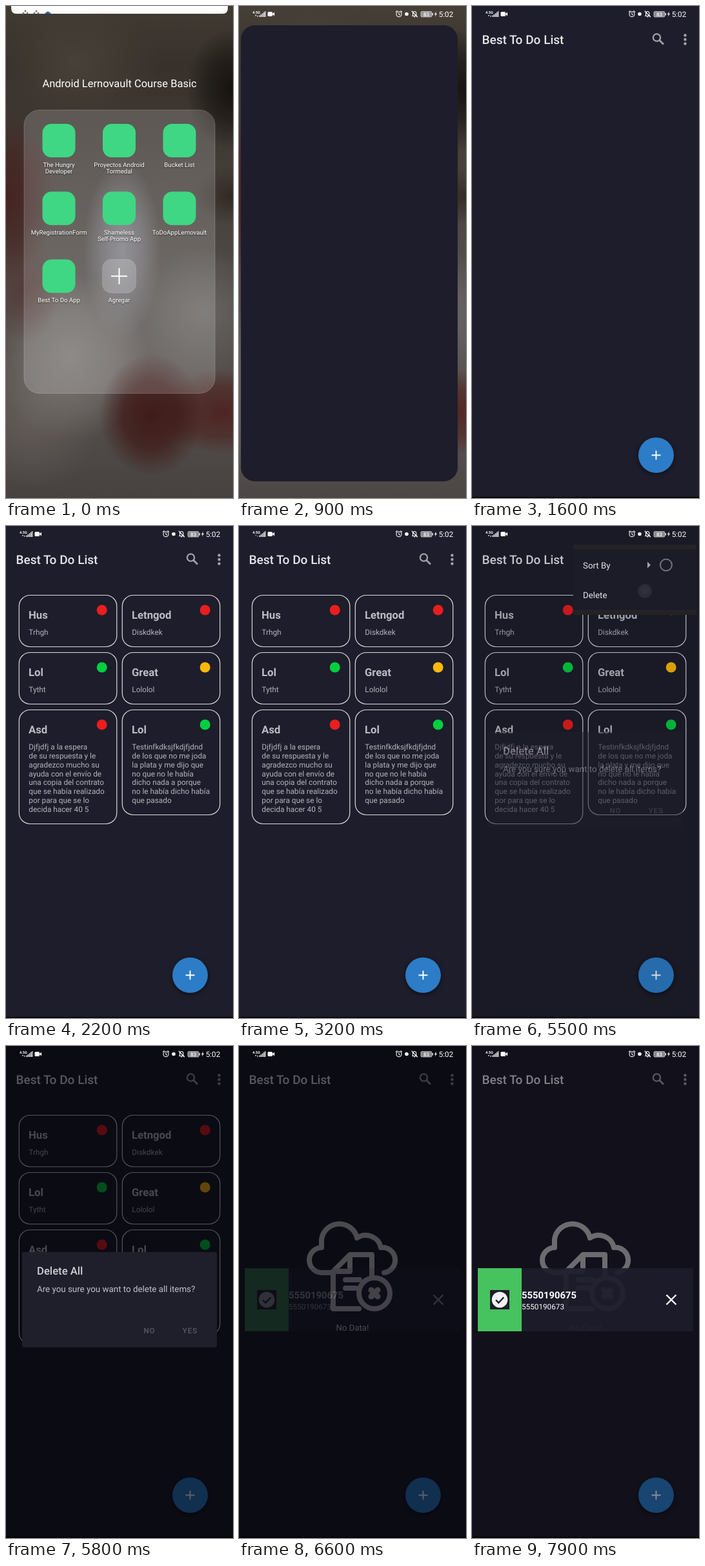
An HTML page that plays this animation: 352x764 px, repeating every 8000 ms.

```html
<!DOCTYPE html>
<html lang="es">
<head>
<meta charset="utf-8">
<title>Best To Do List</title>
<style>
html, body { margin: 0; width: 100%; height: 100%; overflow: hidden; background: #1e1d2b; }
body { position: relative; font-family: Roboto, sans-serif; }
.layer, .layer > svg { position: absolute; left: 0; top: 0; width: 352px; height: 764px; display: block; }
text { font-family: Roboto, sans-serif; text-rendering: geometricPrecision; }
.mid { text-anchor: middle; }
.line { fill: none; stroke-linecap: round; stroke-linejoin: round; }
.layer, .a { animation: 8s linear infinite; }

#home {
  background:
    radial-gradient(70px 95px at 350px 130px, #14100ce6, #14100c88 50%, transparent),
    radial-gradient(60px 45px at 350px 295px, #2e2721cc, transparent),
    radial-gradient(75px 130px at 0 295px, #4b2422f0, #4b242299 55%, transparent),
    radial-gradient(55px 85px at 30px 440px, #5b3633aa, transparent),
    radial-gradient(80px 95px at 225px 635px, #431a17f0, #431a17b0 55%, transparent),
    radial-gradient(110px 65px at 335px 630px, #522522f0, #52252299 60%, transparent),
    radial-gradient(60px 140px at 180px 380px, #8c8d96dd, #8c8d9677 55%, transparent),
    radial-gradient(120px 130px at 100px 545px, #85807ddd, #85807d88 55%, transparent),
    radial-gradient(110px 110px at 40px 640px, #6d6661cc, transparent),
    radial-gradient(100px 100px at 305px 475px, #73716fcc, transparent),
    radial-gradient(130px 90px at 110px 90px, #504940cc, transparent),
    linear-gradient(#463f38, #3b342e 12%, #463f3a 30%, #58524e 60%, #5b5451 80%, #4c4745);
}
#folder { animation-name: folder; }
#shade { animation-name: shade; }
#app { background: #1e1d2b; animation-name: window; }
#bar { animation-name: bar; }
#screen { animation-name: screen; }
#fab { animation-name: fab; transform-origin: 285.5px 697.5px; }
#cards { animation-name: cards; transform-origin: 176px 285px; }
#empty { animation-name: empty; }
#dim { animation-name: dim; }
#menu { animation-name: menu; transform-origin: 348px 29px; }
#dialog { animation-name: dialog; }
#snack { animation-name: snack; }
#touch { animation-name: touch; }
#ripple { animation-name: ripple; }
#data { animation-name: data; }

@keyframes shade {
  0%, 1% { transform: none; }
  3%, 100% { transform: translateY(-16px); }
}
@keyframes folder {
  0%, 7.5% { opacity: 1; }
  10.5%, 100% { opacity: 0; }
}
@keyframes bar {
  0%, 2.5% { opacity: 0; }
  4%, 100% { opacity: 1; }
}
@keyframes window {
  0%, 7.5% { opacity: 0; clip-path: inset(394px 244px 318px 56px round 14px); animation-timing-function: cubic-bezier(.2, .6, .5, 1); }
  8.5% { opacity: 1; clip-path: inset(230px 142px 188px 33px round 18px); animation-timing-function: cubic-bezier(.2, .6, .5, 1); }
  11.25% { opacity: 1; clip-path: inset(30px 13px 26px 3px round 22px); }
  13%, 100% { opacity: 1; clip-path: inset(0 0 0 0 round 0); }
}
@keyframes screen {
  0%, 15.5% { opacity: 0; }
  19%, 100% { opacity: 1; }
}
@keyframes fab {
  0%, 16% { transform: scale(0); animation-timing-function: ease-out; }
  20%, 100% { transform: none; }
}
@keyframes cards {
  0%, 23% { opacity: 0; transform: scale(.94); animation-timing-function: ease-out; }
  26% { opacity: 1; transform: scale(1.012); }
  27.5%, 77.5% { opacity: 1; transform: none; }
  81%, 100% { opacity: 0; transform: none; }
}
@keyframes empty {
  0%, 79% { opacity: 0; }
  82%, 100% { opacity: 1; }
}
@keyframes dim {
  0%, 66% { opacity: 0; }
  68.75% { opacity: .14; }
  72.5%, 96.25% { opacity: .62; }
  98.75% { opacity: .45; }
  100% { opacity: .34; }
}
@keyframes menu {
  0%, 58% { opacity: 0; transform: scale(.55, .35); animation-timing-function: ease-out; }
  62%, 69% { opacity: 1; transform: none; }
  71.5%, 100% { opacity: 0; transform: none; }
}
@keyframes dialog {
  0%, 67.3% { opacity: 0; }
  68.75% { opacity: .5; }
  71%, 77.5% { opacity: 1; }
  80%, 100% { opacity: 0; }
}
@keyframes snack {
  0%, 80.5% { opacity: 0; }
  82.5% { opacity: .16; }
  90%, 100% { opacity: 1; }
}
@keyframes touch {
  0%, 4.5% { opacity: 0; transform: translate(82px, 420px); }
  5.5%, 7% { opacity: .8; transform: translate(82px, 420px); }
  8.2% { opacity: 0; transform: translate(82px, 420px); }
  8.3%, 47% { opacity: 0; transform: translate(332px, 77px); }
  47.5%, 50% { opacity: .7; transform: translate(332px, 77px); }
  52.5% { opacity: 0; transform: translate(332px, 77px); }
  52.6%, 56.6% { opacity: 0; transform: translate(341px, 48px); }
  57.5%, 58.6% { opacity: .85; transform: translate(341px, 48px); }
  60% { opacity: 0; transform: translate(341px, 48px); }
  60.1%, 64% { opacity: 0; transform: translate(268px, 101px); }
  65%, 66.5% { opacity: .8; transform: translate(268px, 101px); }
  68.75% { opacity: .1; transform: translate(268px, 101px); }
  70% { opacity: 0; transform: translate(268px, 101px); }
  70.1%, 76.3% { opacity: 0; transform: translate(285px, 442px); }
  77.5%, 78% { opacity: .7; transform: translate(285px, 442px); }
  80%, 100% { opacity: 0; transform: translate(285px, 442px); }
}
@keyframes ripple {
  0%, 56.6% { opacity: 0; }
  57.5%, 58.5% { opacity: .16; }
  61%, 100% { opacity: 0; }
}
@keyframes data {
  0%, 39.9% { opacity: 1; }
  40%, 51% { opacity: .5; }
  51.1%, 100% { opacity: 1; }
}
</style>
</head>
<body>
<div class="layer" id="home">
  <svg viewBox="0 0 352 764">
    <g id="folder" class="a" fill="#fff">
      <rect width="352" height="764" fill="#000" fill-opacity=".06"/>
      <text class="mid" x="176" y="126" font-size="16.500">Android Lernovault Course Basic</text>
      <rect x="28" y="161.500" width="296" height="440" rx="24" fill-opacity=".17" stroke="#fff" stroke-opacity=".2"/>
      <g id="icons" font-size="9.600" style="text-shadow:0 1px 2px #0009"></g>
      <rect x="149.500" y="393.500" width="52" height="52" rx="14" fill-opacity=".2" stroke="#fff" stroke-opacity=".15"/>
      <path d="M163 419.500h25M175.500 407v25" stroke="#fff" stroke-width="2"/>
    </g>
    <g id="shade" class="a">
      <path d="M8 -6H344V3Q344 12 336 12H16Q8 12 8 3Z" fill="#fdfdfd"/>
      <g fill="#777"><circle cx="30" cy="8" r="1.500"/><circle cx="27" cy="11" r="1.500"/><circle cx="33" cy="11" r="1.500"/><circle cx="47" cy="8" r="1.500"/><circle cx="44" cy="11" r="1.500"/><circle cx="50" cy="11" r="1.500"/></g>
      <path d="M60 12Q65 5 70 12Z" fill="#2d61b0"/>
    </g>
  </svg>
</div>

<div class="layer" id="app">
  <svg viewBox="0 0 352 764">
    <defs>
      <radialGradient id="glow">
        <stop offset="0" stop-color="#f4f4fa"/><stop offset=".5" stop-color="#d2d3de"/><stop offset="1" stop-color="#a2a3b2"/>
      </radialGradient>
    </defs>
    <g id="screen" class="a">
      <text x="15.500" y="59.300" font-size="19" font-weight="500" fill="#e6e6ea">Best To Do List</text>
      <g fill="#a3a3aa">
        <circle cx="286.500" cy="49" r="5.600" fill="none" stroke="#a3a3aa" stroke-width="2.300"/>
        <path d="M290.500 53L297 59.500" stroke="#a3a3aa" stroke-width="2.600"/>
        <circle cx="330.500" cy="45.500" r="2.200"/><circle cx="330.500" cy="52" r="2.200"/><circle cx="330.500" cy="58.500" r="2.200"/>
      </g>
      <g id="empty" class="a">
        <g class="line" stroke="#c2c2c5" stroke-width="8">
          <path d="M146 352H129A19.500 19.500 0 0 1 128 313V300A28 28 0 0 1 183 298A24 24 0 0 1 220 313A19.500 19.500 0 0 1 225 352"/>
          <path d="M186 408H146V350L172 324H206V356M148 350H172V326"/>
          <path d="M165 363H187M165 376H181"/>
          <circle cx="210" cy="384" r="24"/>
          <path d="M205 379l10 10m0 -10l-10 10" stroke-width="9"/>
        </g>
        <text class="mid" x="176" y="442" font-size="13.200" fill="#d4d4d8">No Data!</text>
      </g>
      <g id="cards" class="a"></g>
      <g id="fab" class="a">
        <circle cx="285.500" cy="697.500" r="27.500" fill="#2c7cc7" style="filter:drop-shadow(0 2px 3px #0008)"/>
        <path d="M278.500 697.500h14M285.500 690.500v14" stroke="#fff" stroke-width="1.900"/>
      </g>
    </g>
    <rect id="dim" class="a" width="352" height="764" fill="#000007"/>
    <g id="dialog" class="a">
      <rect x="25" y="320" width="302" height="148" rx="3" fill="#1f1e2b"/>
      <text x="48" y="355" font-size="16.700" font-weight="500" fill="#cfcfd4">Delete All</text>
      <text x="48" y="381.500" font-size="13.350" fill="#c2c2c8">Are you sure you want to delete all items?</text>
      <g class="mid" font-size="11.500" font-weight="500" letter-spacing="1" fill="#5a5a66">
        <text x="222.500" y="446">NO</text><text x="285.500" y="446">YES</text>
      </g>
    </g>
    <g id="menu" class="a">
      <rect x="157" y="29" width="191" height="109" rx="2" fill="#232326"/>
      <rect x="157" y="36" width="191" height="94" fill="#1c1b28"/>
      <g font-size="13.300" fill="#e4e4e8">
        <text x="172" y="65.500">Sort By</text><text x="172" y="112">Delete</text>
      </g>
      <path d="M272 55.500L277 60.500L272 65.500Z" fill="#a5a5aa"/>
      <circle cx="301" cy="60.500" r="9" fill="none" stroke="#75757b" stroke-width="2"/>
    </g>
    <g id="snack" class="a">
      <rect x="9" y="345" width="334" height="98" fill="#1e1d2c" fill-opacity=".93"/>
      <rect x="9" y="345" width="68" height="98" fill="#46c25e"/>
      <rect x="28" y="379" width="30" height="30" fill="#1e1d2b"/>
      <circle cx="43" cy="394" r="12.300" fill="#f1f1f4"/>
      <path d="M37 394.500l4.200 4.200l8 -8.500" fill="none" stroke="#1e1d2b" stroke-width="2.400"/>
      <g fill="#fff">
        <text x="77" y="392" font-size="14.800" font-weight="700">5550190675</text>
        <text x="77" y="409" font-size="11.750">5550190673</text>
      </g>
      <path d="M301.500 386.500l15 15m0 -15l-15 15" stroke="#fff" stroke-width="2.400"/>
    </g>
    <rect y="762.500" width="352" height="1.500"/>
  </svg>
</div>

<div class="layer" id="bar">
  <svg viewBox="0 0 352 764" fill="#fff">
    <text x="21" y="11.700" font-size="5.600" font-weight="700">4.5G</text>
    <path id="data" class="a" d="M25 14h2l-1 2.500zM28 16.500h2l-1 -2.500z"/>
    <path d="M31.500 14.500h1.400v2.500h-1.400zM33.700 13h1.400v4h-1.400zM35.900 11.200h1.400v5.800h-1.400zM38.100 9.500h1.400v7.500h-1.400zM40.200 8h1.100v9h-1.100z"/>
    <rect x="44.500" y="9" width="7.500" height="7" rx="1.500"/>
    <path d="M51.500 12.500L55 9.500V15.500Z"/>
    <g class="line" stroke="#fff" stroke-width="1.100">
      <circle cx="248" cy="12.700" r="4"/>
      <path d="M248 10.500v2.500l1.500 1M243.300 9.300l2 -1.800M252.700 9.300l-2 -1.800"/>
      <path d="M268.500 15.500h7.500M269.500 15v-3q0 -3.500 2.700 -3.500t2.700 3.500v3M271.500 17h1.500M268 8l8.500 9"/>
    </g>
    <circle cx="260" cy="12.500" r="2.800"/>
    <rect x="282" y="8.500" width="17" height="8.500" rx="1.500" fill="#c4c4c6" fill-opacity=".65" stroke="#ddd" stroke-width=".7"/>
    <rect x="299.600" y="11" width="1.300" height="3.500"/>
    <text class="mid" x="290.500" y="15.700" font-size="8" font-weight="500">83</text>
    <path d="M305.500 8.500L303 13.200h1.700L304 16.500L307 11.800h-1.800Z"/>
    <text x="309.700" y="16.600" font-size="11.700">5:02</text>
  </svg>
</div>

<div class="layer">
  <svg viewBox="0 0 352 764">
    <circle id="ripple" class="a" cx="332" cy="51" r="15" fill="#fff"/>
    <circle id="touch" class="a" r="11" fill="url(#glow)"/>
  </svg>
</div>

<script>
const $ = id => document.getElementById(id);
const lines = (list, x, y, step) =>
  list.map((s, i) => `<text x="${x}" y="${y + i * step}">${s}</text>`).join('');

const apps = ['The Hungry|Developer', 'Proyectos Android|Tormedal', 'Bucket List',
  'MyRegistrationForm', 'Shameless|Self-Promo App', 'ToDoAppLernovault',
  'Best To Do App', 'Agregar'];
$('icons').innerHTML = apps.map((name, i) => {
  const x = 82 + (i % 3) * 93.5, y = 183 + Math.floor(i / 3) * 105.3;
  const icon = name === 'Agregar' ? '' :
    `<rect x="${x - 25.5}" y="${y}" width="51" height="52" rx="14" fill="#3fd784"/>`;
  return `${icon}<g class="mid">${lines(name.split('|'), x, y + 66.5, 10.5)}</g>`;
}).join('');

const red = '#e91e1e', green = '#00cf40', amber = '#ffb908';
const cards = [
  [20, 107, 80, red, 'Hus', 'Trhgh'],
  [180, 107, 80, red, 'Letngod', 'Diskdkek'],
  [20, 196, 80, green, 'Lol', 'Tytht'],
  [180, 196, 80, amber, 'Great', 'Lololol'],
  [20, 285, 177, red, 'Asd', 'Djfjdfj a la espera|de su respuesta y le|agradezco mucho su|ayuda con el envío de|una copia del contrato|que se había realizado|por para que se lo|decida hacer 40 5'],
  [180, 285, 163, green, 'Lol', 'Testinfkdksjfkdjfjdnd|de los que no me joda|la plata y me dijo que|no que no le había|dicho nada a porque|no le había dicho había|que pasado']
];
$('cards').innerHTML = cards.map(([x, y, h, color, title, body]) => `
  <rect x="${x + .3}" y="${y + .5}" width="151.5" height="${h}" rx="17" fill="#1e1d2b" stroke="#dcdce0" stroke-width="1.2"/>
  <circle cx="${x + 128.7}" cy="${y + 23.5}" r="8" fill="${color}"/>
  <text x="${x + 15}" y="${y + 37}" font-size="16.7" font-weight="700" fill="#bebdc4">${title}</text>
  <g font-size="11.8" fill="#b4b3bb">${lines(body.split('|'), x + 15.3, y + 62.3, 13.75)}</g>`).join('');
</script>
</body>
</html>
```
